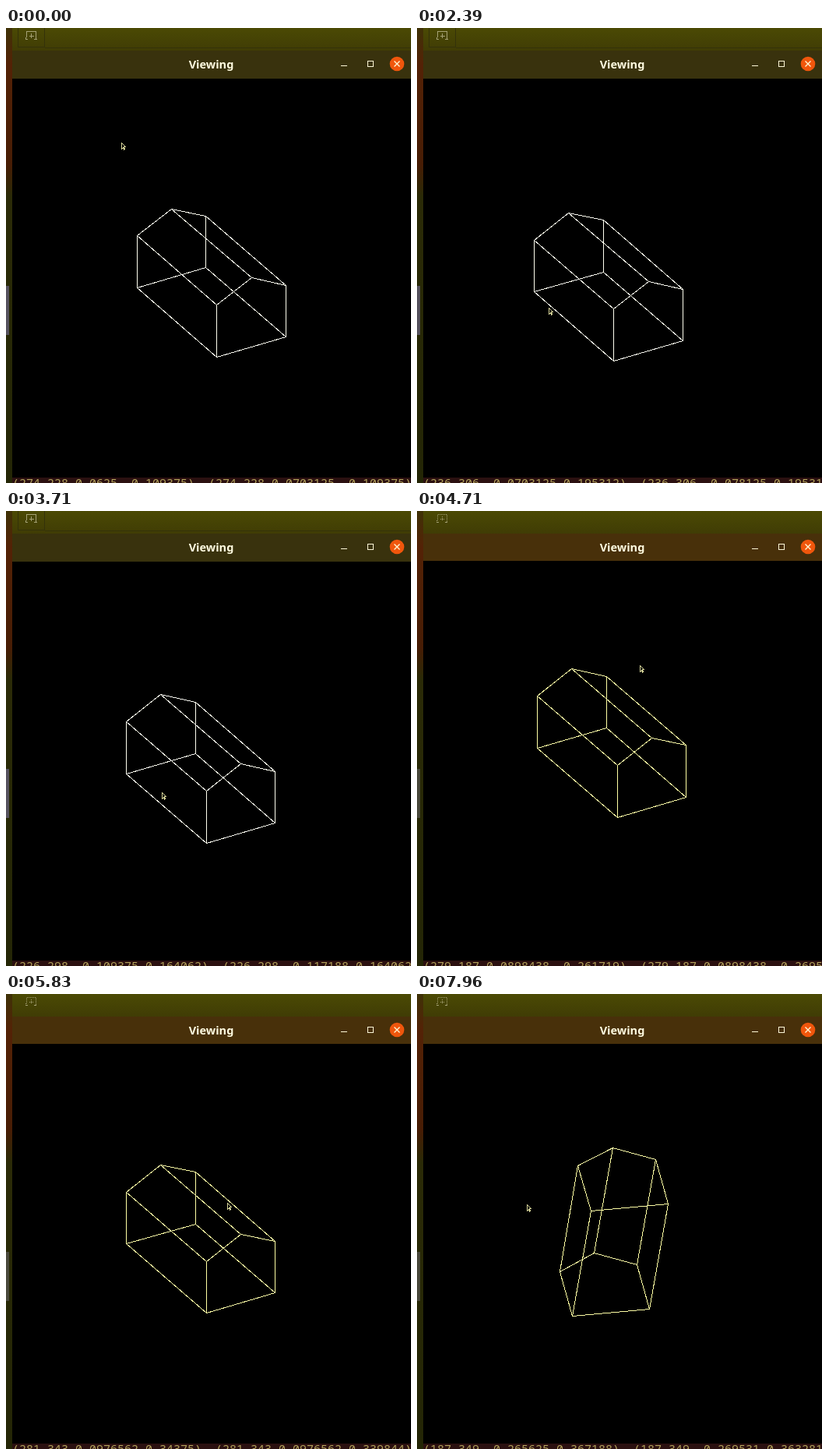
These frames come from a looping animation (520x584 px, 8000 ms). An HTML page:

```html
<!DOCTYPE html>
<html lang="en">
<head>
<meta charset="utf-8">
<title>Viewing</title>
<style>
  html, body { margin: 0; width: 100%; height: 100%; overflow: hidden; background: #000; }
  svg { display: block; width: 520px; height: 584px; }
  .crisp { shape-rendering: crispEdges; }
  .title { font: bold 14.5px "Noto Sans", "Open Sans", sans-serif; }
  .log { font: 15px "Noto Sans Mono", "DejaVu Sans Mono", monospace; white-space: pre; }
</style>
</head>
<body>
<svg viewBox="0 0 520 584">
  <defs>
    <linearGradient id="side" x1="0" y1="0" x2="0" y2="1">
      <stop offset="0" stop-color="#3f3207"/>
      <stop offset=".08" stop-color="#542206"/>
      <stop offset=".3" stop-color="#481d05"/>
      <stop offset=".37" stop-color="#2b2b07"/>
      <stop offset="1" stop-color="#242606"/>
    </linearGradient>
    <linearGradient id="tabs" x1="0" y1="0" x2="0" y2="1">
      <stop offset="0" stop-color="#4b4a04"/>
      <stop offset="1" stop-color="#403c05"/>
    </linearGradient>
  </defs>
  <g class="crisp">
    <rect width="520" height="584" fill="#000"/>
    <rect width="8" height="584" fill="url(#side)"/>
    <rect id="thumb" y="331" width="4" height="63"/>
    <rect x="8" width="512" height="29" fill="url(#tabs)"/>
    <path id="tabEdge" d="M15.5 0V24.5H49.5V0M50 25.5H520" fill="none" stroke="#34320a"/>
    <path id="tabIcon" d="M28 14.5H25.5V12M26.5 12V4.5H38.5V14.5H36M32.5 7V13M29.5 10H35.5M26 14.5H28M36 14.5H40" fill="none" stroke="#a5a275"/>
    <rect id="bar" x="8" y="29" width="512"/>
    <rect x="8" y="577" width="512" height="7" fill="#2b1010"/>
    <path d="M430 48.5H438" stroke="#fff8d8"/>
    <rect x="464.5" y="42.5" width="7" height="7" fill="none" stroke="#fff8d8"/>
  </g>
  <text class="title" x="263.5" y="52" text-anchor="middle" fill="#fffbe0">Viewing</text>
  <circle cx="502" cy="46" r="9.3" fill="#f0560c"/>
  <path d="M498.5 42.5l7 7m0-7l-7 7" stroke="#fff4d0" stroke-width="1.4"/>
  <text class="log" id="log" x="8" y="589" fill="#b3a25c"></text>
  <path class="crisp" id="house" fill="none" stroke-width="1"/>
  <path class="crisp" id="cursor" d="M.5 .5V8.5L2.5 7L4 9.5M.5 .5L5.5 5.5H3.5L4.5 9.5" fill="#000" stroke="#d8d69a"/>
</svg>
<script>
const LOOP = 8000, STEP = 66.33, SIZE = 102.4;
const $ = id => document.getElementById(id);
const clamp = (v, lo, hi) => Math.min(hi, Math.max(lo, v));

// rows: time, x, y
const pointer = [
  [0, 148, 147], [265, 152, 169], [540, 152, 169], [1390, 304, 306], [1460, 304, 306],
  [1790, 436, 318], [2388, 169, 359], [2860, 500, 350], [3450, 203, 364], [3714, 200, 361],
  [4200, 287, 338], [4709, 286, 198], [5130, 286, 50], [5500, 285, 335], [5837, 284, 268],
  [6080, 285, 226], [6300, 285, 247], [6600, 290, 330], [6850, 296, 300], [7363, 300, 389],
  [7620, 262, 415], [7955, 141, 270]
];
// rows: time, turns about the x, y and z axes in degrees
const spin = [
  [6600, 0, 0, 0], [6850, 6, 0, 0], [7363, -12, 0, 0],
  [7720, -60, -2, -1], [7955, -70.6, -9.8, -6.8]
];
// rows: time, printed x, y, and the step from the value before
const prints = [
  [1460, 274, 228, 2, 0], [2388, 236, 306, -2, 0], [2900, 296, 290, 2, 0],
  [3714, 226, 298, -2, 0], [4709, 279, 187, 0, -2], [5837, 281, 343, 0, -1],
  [7363, 298, 279, 0, 1], [7955, 187, 349, -1, -1]
];

// Monotone cubic through one column of a key table
function sample(keys, t, col) {
  const last = keys.length - 1;
  if (t <= keys[0][0]) return keys[0][col];
  if (t >= keys[last][0]) return keys[last][col];
  let i = 0;
  while (keys[i + 1][0] <= t) i++;
  const slope = j => (keys[j + 1][col] - keys[j][col]) / (keys[j + 1][0] - keys[j][0]);
  const tangent = j => {
    if (j === 0 || j === last) return 0;
    const a = slope(j - 1), b = slope(j);
    return a * b > 0 ? 2 * a * b / (a + b) : 0;
  };
  const h = keys[i + 1][0] - keys[i][0], u = (t - keys[i][0]) / h, v = 1 - u;
  return keys[i][col] * (1 + 2 * u) * v * v + keys[i + 1][col] * u * u * (3 - 2 * u)
    + h * u * v * (tangent(i) * v - tangent(i + 1) * u);
}

// Six significant digits, ties to even
function digits(n) {
  const v = Math.abs(n) / 256;
  if (!v) return "0";
  const d = 10 ** (5 - Math.floor(Math.log10(v)));
  const q = v * d;
  let r = Math.floor(q);
  if (q - r > .5 || (q - r === .5 && r % 2)) r++;
  return (n < 0 ? "-" : "") + r / d;
}

function logText(t) {
  const x = Math.round(sample(prints, t, 1)), y = Math.round(sample(prints, t, 2));
  const key = prints.find(k => k[0] >= t - 12) || prints[prints.length - 1];
  const entry = (a, b) => `(${x},${y},${digits(a - 256)},${digits(b - 256)})`;
  return entry(x - key[3], y - key[4]) + ", " + entry(x, y) + ", ";
}

const profile = [[-.5, -.5], [-.5, .25], [0, .5], [.5, .25], [.5, -.5]];
const turn = (a, b, deg) => {
  const r = deg * Math.PI / 180, c = Math.cos(r), s = Math.sin(r);
  return [a * c - b * s, a * s + b * c];
};

function housePath(t) {
  const tx = .00148 * (sample(pointer, clamp(t, 1460, 3714), 1) - 304) * SIZE;
  const ty = .236 * (sample(pointer, clamp(t, 4200, 6300), 2) - 338);
  const cx = 263.8 + tx * .866, cy = 320.7 - tx * .25 + ty;
  const [ax, ay, az] = [1, 2, 3].map(c => sample(spin, t, c));
  const project = (x, y, z) => {
    [x, y] = turn(x, y, az);
    [y, z] = turn(y, z, ax);
    [z, x] = turn(z, x, ay);
    const px = cx + SIZE * (.866 * x + .5 * z);
    const py = cy + SIZE * (-.25 * x - .866 * y + .433 * z);
    return (Math.floor(px) + .5) + " " + (Math.floor(py) + .5);
  };
  const [back, front] = [-1, 1].map(z => profile.map(([x, y]) => project(x, y, z)));
  const ring = pts => "M" + pts.join("L") + "Z";
  return ring(back) + ring(front) + back.map((p, i) => `M${p}L${front[i]}`).join("");
}

function render(now) {
  const t = Math.floor((now % LOOP) / STEP + .15) * STEP;
  const late = t > 4030;
  $("house").setAttribute("d", housePath(t));
  $("house").setAttribute("stroke", late ? "#ffffa4" : "#fffff0");
  $("cursor").setAttribute("transform",
    `translate(${Math.round(sample(pointer, t, 1))} ${Math.round(sample(pointer, t, 2))})`);
  $("log").textContent = logText(t);
  $("bar").setAttribute("height", late ? 35 : 36);
  $("bar").setAttribute("fill", late ? "#48300a" : "#39320d");
  $("thumb").setAttribute("fill", late ? "#4a493c" : "#56525e");
  $("tabIcon").setAttribute("stroke-dasharray", late ? "1 1" : "none");
  $("tabEdge").setAttribute("stroke-opacity", late ? 0 : 1);
}

const start = performance.now();
function loop() {
  render(performance.now() - start);
  requestAnimationFrame(loop);
}
loop();
</script>
</body>
</html>
```
